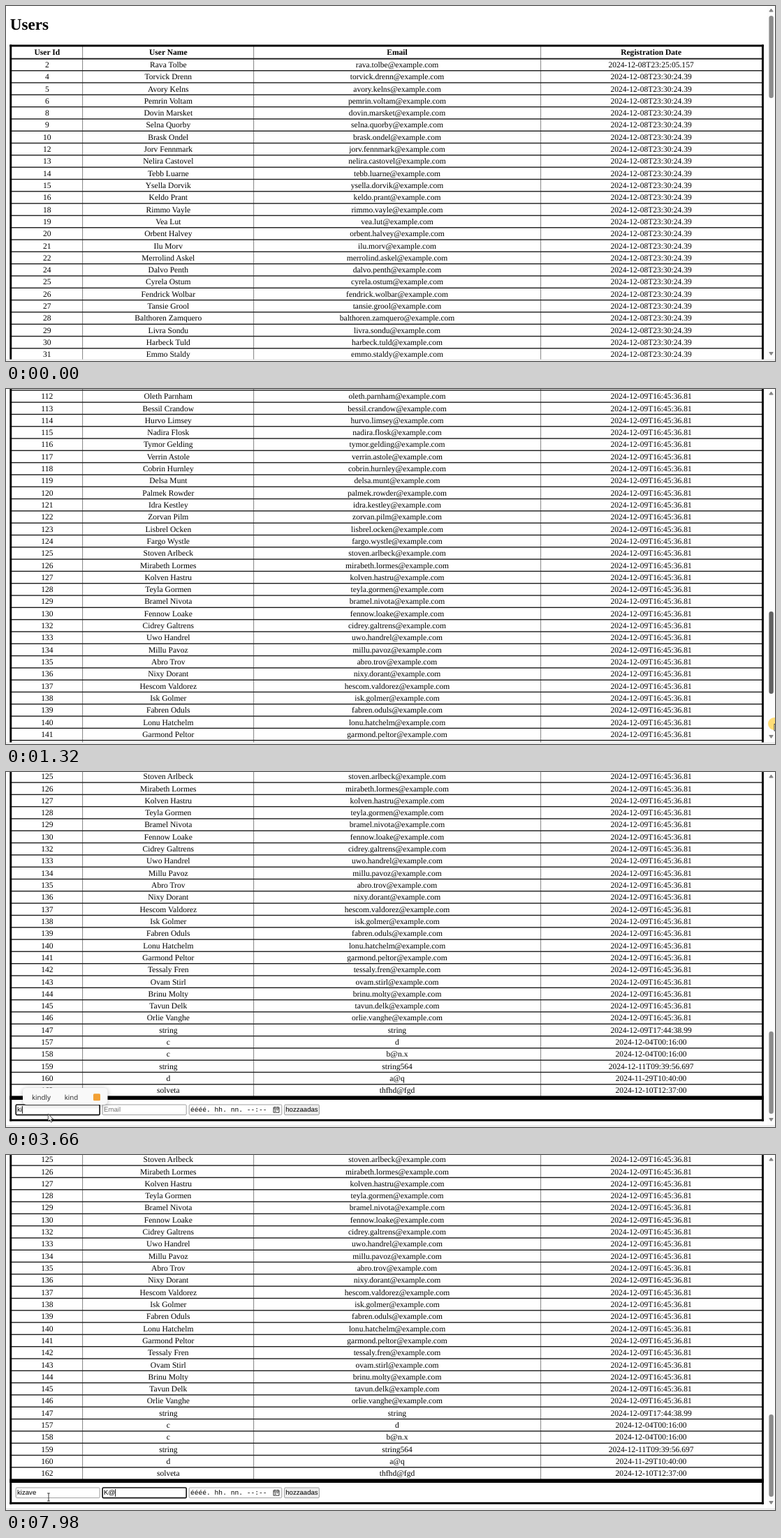
Write an HTML page that moves like this. It is 1101 px wide and 509 px high and loops after 8000 ms.

```html
<!DOCTYPE html>
<html lang="en">
<head>
<meta charset="utf-8">
<title>Users</title>
<style>
html, body { margin: 0; width: 100%; height: 100%; overflow: hidden; background: #fff; }
svg { display: block; width: 1101px; height: 509px; text-rendering: geometricPrecision; }
#page { font: 11.55px "Liberation Serif", "Times New Roman", serif; text-anchor: middle; }
#page .h1 { font-size: 23.1px; font-weight: bold; text-anchor: start; }
#page .th { font-weight: bold; }
#form { font: 9.62px "Liberation Sans", Arial, sans-serif; text-anchor: start; }
#form .mono { font-family: "Liberation Mono", monospace; }
.field { fill: #fff; stroke: #858585; stroke-width: .8; }
.field.focus { stroke: #101010; stroke-width: 1.6; }
.hint { fill: #757575; }
.float { fill: #fff; filter: drop-shadow(0 1px 3px rgba(0, 0, 0, .28)); }
.bar { font: 9.8px "Open Sans", "Noto Sans", sans-serif; text-anchor: middle; fill: #222; }
.bar .float { fill: #f9f9f9; }
</style>
</head>
<body>
<svg viewBox="0 0 1101 509">
  <rect width="1101" height="509" fill="#fff"/>
  <g id="page"></g>
  <rect id="panel" class="float" width="253" rx="3"/>
  <g id="bars"></g>
  <rect x="1090" width="11" height="509" fill="#fcfcfc"/>
  <g fill="#858585" stroke="#858585" stroke-linejoin="round">
    <path d="M1092.8 8 L1095.5 4 L1098.2 8 Z"/>
    <path d="M1092.8 496.5 L1095.5 500.5 L1098.2 496.5 Z"/>
  </g>
  <rect id="thumb" x="1092.4" y="14" width="6.4" height="118" rx="3.2"/>
  <rect y="507" width="1101" height="2" fill="#f3f3f3"/>
  <rect y="506.6" width="1101" height="1" fill="#e2e2e2"/>
  <g id="mouse">
    <circle id="press" r="9" fill="#ffd34a" fill-opacity=".75"/>
    <path id="arrow" d="M0 0 V10.4 L2.4 8.2 L4.1 12 L5.8 11.2 L4.2 7.6 H7.4 Z" fill="#fff" stroke="#222" stroke-width=".8"/>
    <path id="beam" d="M-1.8 -5.5 H1.8 M0 -5.5 V5.5 M-1.8 5.5 H1.8" fill="none" stroke="#222" stroke-width=".9"/>
  </g>
</svg>
<script>
const LOOP = 8000, ROW = 17.31, MAX_SCROLL = 1549, THUMB_TRAVEL = 358;
const COLUMNS = [58.8, 232.3, 560, 923.6];
const $ = id => document.getElementById(id);
const text = (x, y, s, cls = "") => `<text x="${x}" y="${y}" class="${cls}">${s}</text>`;
const rect = (x, y, w, h, attrs = "") => `<rect x="${x}" y="${y}" width="${w}" height="${h}" ${attrs}/>`;
const show = (el, on) => { el.style.display = on ? "" : "none"; };

const names = `Rava Tolbe,Torvick Drenn,Avory Kelns,Pemrin Voltam,Dovin Marsket,Selna Quorby,Brask Ondel,
Jorv Fennmark,Nelira Castovel,Tebb Luarne,Ysella Dorvik,Keldo Prant,Rimmo Vayle,Vea Lut,Orbent Halvey,
Ilu Morv,Merrolind Askel,Dalvo Penth,Cyrela Ostum,Fendrick Wolbar,Tansie Grool,Balthoren Zamquero,
Livra Sondu,Harbeck Tuld,Emmo Staldy,Gavro Pelk,Nirelle Cambo,Ostrin Veyd,Felma Durrick,Kestrom Bolavez,
Vermelle Thornack,Ombry Larchell,Nylo Santrel,Durwent Sackle,Pirra Hestling,Corvanius Melps,Ovva Rastor,
Tolmar Greskin,Jelsa Mintow,Wendro Palvis,Hylsa Crov,Maveen Trusko,Belfram Nusk,Fyo Landek,Corb Winterel,
Suli Brenk,Garvel Oxwenth,Thyrra Mandeck,Lothen Pavira,Quelinda Sertos,Hobrin Tyley,Rosveth Culder,
Fenno Barlim,Dreck Nolmar,Mirsa Duv,Ulvo Prawde,Cassimel Yord,Jasp Kellverton,Onna Tibbrel,
Wexin Farrole,Lumira Haske,Tordan Velk,Ebrina Coswell,Mardo Tunnick,Silvane Orpe,Radlow Jentis,Pella Monkrey,
Gristan Holve,Yolmi Darque,Ansel Brovick,Kirda Welmot,Juvren Tasko,Oleth Parnham,Bessil Crandow,Hurvo Limsey,
Nadira Flosk,Tymor Gelding,Verrin Astole,Cobrin Hurnley,Delsa Munt,Palmek Rowder,Idra Kestley,Zorvan Pilm,
Lisbrel Ocken,Fargo Wystle,Stoven Arlbeck,Mirabeth Lormes,Kolven Hastru,Teyla Gormen,Bramel Nivota,
Fennow Loake,Cidrey Galtrens,Uwo Handrel,Millu Pavoz,Abro Trov,Nixy Dorant,Hescom Valdorez,Isk Golmer,
Fabren Oduls,Lonu Hatchelm,Garmond Peltor,Tessaly Fren,Ovam Stirl,Brinu Molty,Tavun Delk,Orlie Vanghe`
  .split(/,\s*/);
const ids = "2 4-6 8-10 12-16 18-22 24-43 46-49 79-90 92-110 112-130 132-147 157-160 162"
  .split(" ").flatMap(range => {
    const [first, last = first] = range.split("-").map(Number);
    return Array.from({ length: last - first + 1 }, (_, i) => first + i);
  });
const entries = {
  147: ["string", "string", "2024-12-09T17:44:38.99"],
  157: ["c", "d", "2024-12-04T00:16:00"],
  158: ["c", "b@n.x", "2024-12-04T00:16:00"],
  159: ["string", "string564", "2024-12-11T09:39:56.697"],
  160: ["d", "a@q", "2024-11-29T10:40:00"],
  162: ["solveta", "thfhd@fgd", "2024-12-10T12:37:00"]
};

function record(id, i) {
  if (entries[id]) return [id, ...entries[id]];
  const email = names[i].toLowerCase().replace(" ", ".") + "@example.com";
  const date = id === 2 ? "2024-12-08T23:25:05.157"
    : id < 50 ? "2024-12-08T23:30:24.39" : "2024-12-09T16:45:36.81";
  return [id, names[i], email, date];
}

function buildPage() {
  const cells = (values, y, cls) => values.map((v, c) => text(COLUMNS[c], y, v, cls)).join("");
  const bottom = MAX_SCROLL + 500.7;
  let out = text(5.8, 34.4, "Users", "h1");
  for (const x of [109.6, 354.6, 765.6]) out += rect(x - .4, 57, .9, MAX_SCROLL + 408, 'fill="#777"');
  out += cells(["User Id", "User Name", "Email", "Registration Date"], 69.9, "th");
  ids.forEach((id, i) => {
    out += rect(7, 74.7 + i * ROW, 1076, i ? 1.4 : 1.9, 'fill="#1c1c1c"');
    out += cells(record(id, i), 87.9 + i * ROW, "");
  });
  out += rect(5.3, 55.5, 1079.6, 2.9) + rect(5.3, 55.5, 2.9, bottom - 55.5)
    + rect(1082, 55.5, 2.9, bottom - 55.5) + rect(5.3, bottom - 2.9, 1079.6, 2.9)
    + rect(5.3, MAX_SCROLL + 464.4, 1079.6, 5.6);
  out += `<g id="form" transform="translate(0 ${MAX_SCROLL})">
    ${rect(14.2, 477, 120, 14.6, 'rx="1.4" class="field" id="nameBox"')}
    ${rect(138.2, 477, 120, 14.6, 'rx="1.4" class="field" id="emailBox"')}
    ${rect(262.2, 477, 132.6, 14.6, 'rx="1.4" class="field"')}
    ${rect(398.6, 477, 49.8, 14.6, 'rx="1.4" class="field" style="fill:#efefef"')}
    <text id="nameText" x="16" y="487.4"></text><text id="emailText" x="140" y="487.4"></text>
    ${text(264, 487.4, "éééé. hh. nn. --:--", "mono")}${text(400.2, 487.4, "hozzaadas")}
    <path d="M383 480.8 h8 v7.4 h-8 z M383 482.8 h8 M385 479.8 v1.6 M389 479.8 v1.6 M384.6 484.6 h2 M387.6 484.6 h2 M384.6 486.4 h2" fill="none" stroke="#222" stroke-width=".9"/>
    ${rect(0, 479, .9, 10.8, 'id="caret"')}</g>`;
  $("page").innerHTML = out;
}

function buildBars() {
  const bar = (x, w, a, b) => `<g class="bar">${rect(x, 453, w, 24, 'rx="5" class="float"')}
    ${text(x + 26.5, 469.6, a)}${text(x + w - 52, 469.6, b)}
    ${rect(x + w - 20.5, 461.3, 10, 10, 'rx="1.5" fill="#f2a135"')}</g>`;
  $("bars").innerHTML = bar(24, 121.5, "kindly", "kind") + bar(46, 127, "kindly", "kind") + bar(148, 140, "Know", "Keep");
}

// Tracks hold [start ms, value...] and keep each value until the next start.
const scroll = [[0, 0], [1060, 14], [1120, 200], [1180, 582.5], [1250, 970], [1310, 1320], [1380, MAX_SCROLL]];
const thumbColor = [[0, "#8b8b8b"], [710, "#757575"], [780, "#606060"], [1510, "#8b8b8b"]];
const mouse = [
  [0, ""], [120, "arrow", 1078, 490], [190, "arrow", 1092, 275], [250, ""],
  [980, "arrow", 1098, 113, 1], [1060, "arrow", 1098, 116, 1], [1120, "arrow", 1101, 248, 1],
  [1180, "arrow", 1102, 337, 1], [1250, "arrow", 1102, 430, 1], [1310, "arrow", 1100, 480, 1],
  [1440, "arrow", 1080, 488], [1510, "arrow", 860, 486], [1580, "arrow", 520, 484],
  [1640, "arrow", 240, 483], [1710, "beam", 50, 485], [2120, "arrow", 42.5, 494.5],
  [2180, "beam", 61, 480], [2380, "beam", 61, 490], [2580, "beam", 61, 490, 1],
  [2720, "beam", 61, 490], [3520, "arrow", 60.3, 490.3], [5920, "beam", 61, 490.5]
];
const focus = [[0, ""], [1710, "name"], [5260, "email"]];
const caretOn = [[0, 0], [1710, 1], [2120, 0], [2580, 1], [3130, 0], [3400, 1], [4050, 0],
  [4330, 1], [5790, 0], [6250, 1], [7450, 0], [7980, 1]];
const typedName = [[0, ""], [3400, "k"], [3520, "ki"], [4330, "kiz"], [4420, "kiza"], [4510, "kizav"], [4710, "kizave"]];
const typedEmail = [[0, ""], [6250, "K"], [6920, "K@"]];
const panel = [[0], [2650, 17.5, 310], [3400], [6250, 141.5, 353], [6780]];
const activeBar = [[0, -1], [3660, 0], [4330, -1], [4910, 1], [5260, -1], [6450, 2], [6780, -1]];
const at = (track, t) => track.findLast(step => step[0] <= t).slice(1);

function setField(key, value, focused) {
  const label = $(key + "Text");
  label.textContent = value || (key === "name" ? "User Name" : "Email");
  label.classList.toggle("hint", !value);
  $(key + "Box").classList.toggle("focus", focused);
  if (focused) $("caret").setAttribute("x", +label.getAttribute("x") + (value ? label.getComputedTextLength() : 0));
}

function draw(now) {
  const t = now % LOOP;
  const [top] = at(scroll, t), [focused] = at(focus, t);
  $("page").setAttribute("transform", `translate(0 ${-top})`);
  $("thumb").setAttribute("y", 14 + top / MAX_SCROLL * THUMB_TRAVEL);
  $("thumb").setAttribute("fill", at(thumbColor, t)[0]);

  setField("name", at(typedName, t)[0], focused === "name");
  setField("email", at(typedEmail, t)[0], focused === "email");
  show($("caret"), at(caretOn, t)[0]);

  const [px, py] = at(panel, t);
  show($("panel"), px);
  if (px) {
    $("panel").setAttribute("x", px);
    $("panel").setAttribute("y", py);
    $("panel").setAttribute("height", 474 - py);
  }
  const [barIndex] = at(activeBar, t);
  [...$("bars").children].forEach((bar, i) => show(bar, i === barIndex));

  const [kind, x = 0, y = 0, pressed] = at(mouse, t);
  $("mouse").setAttribute("transform", `translate(${x} ${y})`);
  show($("arrow"), kind === "arrow");
  show($("beam"), kind === "beam");
  show($("press"), pressed);
  requestAnimationFrame(draw);
}

buildPage();
buildBars();
draw(performance.now());
</script>
</body>
</html>
```
